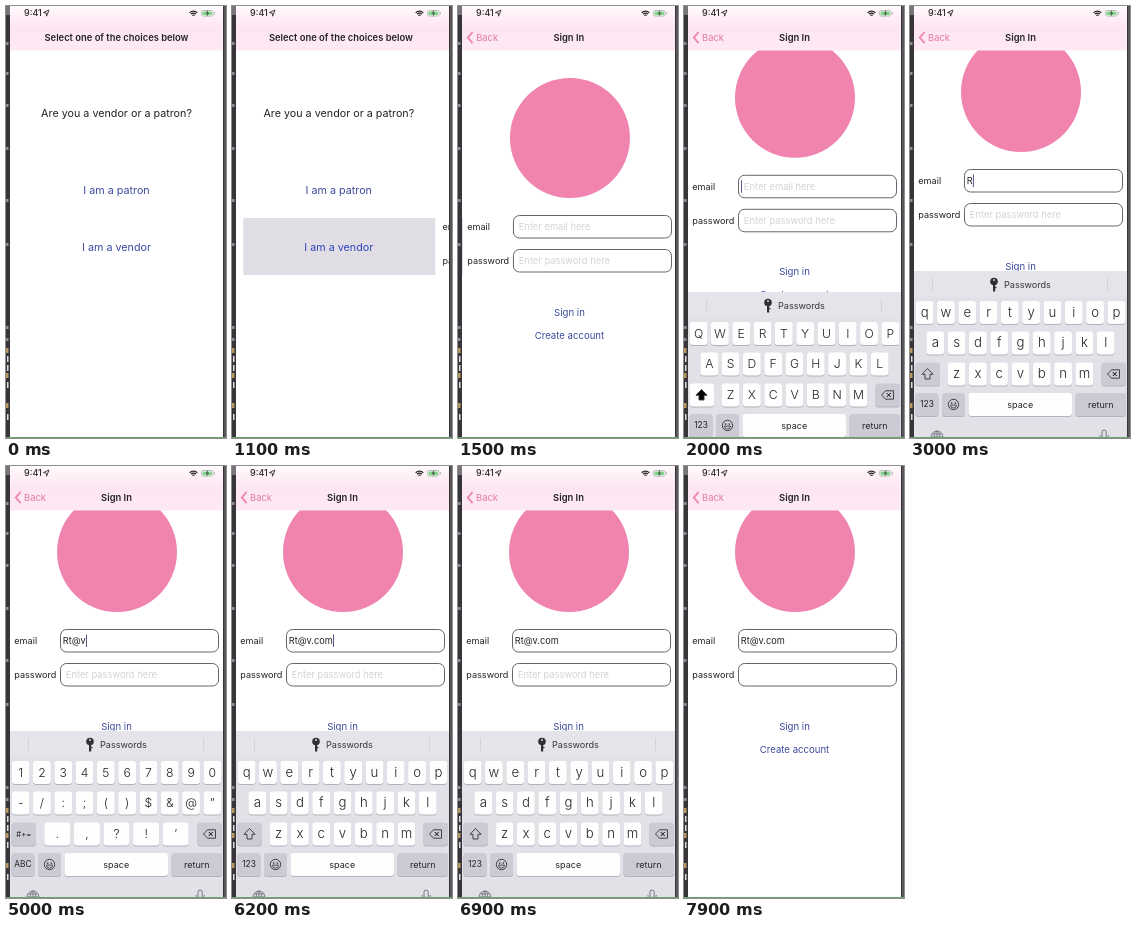
An HTML page with a canvas for the animation above (8 s loop, 220 px wide and 432 px high).

```html
<!DOCTYPE html>
<html lang="en">
<head>
<meta charset="utf-8">
<title>Sign in on a phone</title>
<style>
html, body { margin: 0; width: 100%; height: 100%; overflow: hidden; background: #fff; }
canvas { display: block; width: 220px; height: 432px; }
</style>
</head>
<body>
<canvas id="stage"></canvas>
<script>
const W = 220, H = 432, LOOP = 8000, TICK = 100;
const LEFT = 4, RIGHT = 217, WIDTH = RIGHT - LEFT, MID = 110.5, KB_TOP = 265;
const UI = 'Inter, Roboto, sans-serif';
const PINK = '#f084ae', LINK = '#3d4a9c', INK = '#232327';
const KB = '#e2e1e8', BAR = '#e5e4eb', GREY_KEY = '#cbcad5';

const canvas = document.getElementById('stage');
const c = canvas.getContext('2d');
const dpr = window.devicePixelRatio || 1;
canvas.width = W * dpr;
canvas.height = H * dpr;

const clamp = v => Math.max(0, Math.min(1, v));

// Critically damped spring from 0 to 1, settled after half a second
function spring(t, start) {
  const u = 18 * (t - start) / 1000;
  if (u <= 0) return 0;
  return u > 9 ? 1 : 1 - (1 + u) * Math.exp(-u);
}

const PRESS = 1000, PUSH = 1080, EMAIL_FOCUS = 1800, PASSWORD_FOCUS = 7000;

// Typing: time, character
const strokes = [[2900, 'R'], [3300, 't'], [4000, '@'], [4600, 'v'],
  [5200, '.'], [5700, 'c'], [5900, 'o'], [6100, 'm']];
// Keyboard layout: time, name
const layouts = [[0, 'upper'], [2900, 'lower'], [3700, 'symbols'],
  [4300, 'lower'], [4900, 'symbols'], [5400, 'lower']];
const rows = {
  upper: ['QWERTYUIOP', 'ASDFGHJKL', 'ZXCVBNM'],
  lower: ['qwertyuiop', 'asdfghjkl', 'zxcvbnm'],
  symbols: ['1234567890', '-/:;()$&@”', '.,?!’']
};

function text(s, x, y, size, color = INK, align = 'center', weight = 400) {
  c.font = `${weight} ${size}px ${UI}`;
  c.fillStyle = color;
  c.textAlign = align;
  c.textBaseline = 'alphabetic';
  c.fillText(s, x, y);
}

function rect(x, y, w, h, color) {
  c.fillStyle = color;
  c.fillRect(x, y, w, h);
}

function round(x, y, w, h, r, fill, stroke) {
  c.beginPath();
  c.roundRect(x, y, w, h, r);
  if (fill) { c.fillStyle = fill; c.fill(); }
  if (stroke) { c.strokeStyle = stroke; c.lineWidth = 1; c.stroke(); }
}

function poly(points, fill, stroke, width = 1, close = true) {
  c.beginPath();
  points.forEach(([x, y]) => c.lineTo(x, y));
  if (close) c.closePath();
  if (fill) { c.fillStyle = fill; c.fill(); }
  if (stroke) { c.strokeStyle = stroke; c.lineWidth = width; c.stroke(); }
}

function arc(x, y, r, a, b, color, width) {
  c.beginPath();
  c.arc(x, y, r, a, b);
  c.strokeStyle = color;
  c.lineWidth = width;
  c.stroke();
}

function dot(x, y, r, color) {
  c.beginPath();
  c.arc(x, y, r, 0, Math.PI * 2);
  c.fillStyle = color;
  c.fill();
}

function drawDesk() {
  rect(0, 0, W, H, '#37343a');
  rect(0, 0, 4, 9, '#77747a');
  for (const y of [36, 66, 98, 141, 193, 237, 320, 332]) rect(0, y, 2.5, 3, '#8f8b92');
  for (const y of [342, 367, 397]) rect(0, y, 2.5, 5, '#b8975f');
  for (const y of [350, 359, 376, 408]) rect(1, y, 1.5, 6, '#dedce0');
  rect(RIGHT + 1, 0, 2, H, '#59565c');
}

function drawChoices(t, shift) {
  const pressed = t >= PRESS;
  c.save();
  c.translate(shift, 0);
  if (pressed) rect(15, 212, 192, 57, '#e0dde4');
  text('Are you a vendor or a patron?', MID, 111, 10.75);
  text('I am a patron', MID, 188, 10.75, LINK);
  text('I am a vendor', MID, 245, 10.75, pressed ? '#3046bd' : LINK);
  c.restore();
}

function drawField(y, label, hint, value, caret) {
  text(label, 8.3, y + 14.7, 9.1, INK, 'left');
  round(54.5, y, 158, 22.5, 6, '#fff', '#66646a');
  if (value) text(value, 56.8, y + 14.3, 9.2, INK, 'left');
  else if (hint) text(hint, 59.8, y + 14.8, 9.35, '#d3d2d7', 'left');
  if (caret) {
    c.font = '9.2px ' + UI;
    const x = 57 + (value ? c.measureText(value).width : 0);
    rect(x, y + 5, 1, 12.5, '#55598c');
  }
}

function drawSignIn(t, shift, drop) {
  c.save();
  c.translate(shift, 0);
  rect(LEFT, 0, WIDTH, H, '#fff');
  c.translate(0, drop);
  dot(111, 86, 60, PINK);

  const typed = strokes.filter(s => s[0] <= t);
  const value = typed.map(s => s[1]).join('');
  const since = t - (typed.length ? typed[typed.length - 1][0] : EMAIL_FOCUS);
  const caret = t >= EMAIL_FOCUS && t < PASSWORD_FOCUS && since % 1000 < 600;
  drawField(163.5, 'email', 'Enter email here', value, caret);
  drawField(197.5, 'password', t < PASSWORD_FOCUS ? 'Enter password here' : '', '', false);

  text('Sign in', MID, 263.7, 9.6, LINK);
  text('Create account', MID, 286.7, 9.6, LINK);
  c.restore();
}

function drawStatus() {
  text('9:41', 18, 10.4, 9, '#2a2a2a', 'left', 500);
  poly([[43, 4], [40.6, 10.2], [40.2, 7], [37.4, 6.6]], null, '#333', 0.9);
  for (const r of [1.6, 3.5, 5.4]) arc(187.5, 10.6, r, Math.PI * 1.25, Math.PI * 1.75, '#222', 1.2);
  round(195.5, 4.5, 11.5, 5.6, 1.7, '#fff', '#b9beb9');
  round(196.5, 5.4, 9.5, 3.8, 1, '#84d38c');
  poly([[202.2, 3.7], [199.6, 7.6], [201.2, 7.6], [200.6, 10.8], [203.2, 6.8], [201.6, 6.8]], '#4a554a');
  rect(208, 6, 1, 2.6, '#b9beb9');
}

function drawHeader(p) {
  const g = c.createLinearGradient(0, 0, 0, 45);
  g.addColorStop(0, '#fffafd');
  g.addColorStop(0.2, '#fff0f7');
  g.addColorStop(0.5, '#fde6f2');
  g.addColorStop(1, '#fde9f4');
  rect(LEFT, 0, WIDTH, 44.5, g);
  c.globalAlpha = 1 - clamp(p * 1.6 - 0.15);
  text('Select one of the choices below', MID - 30 * p, 35, 9.4, INK, 'center', 600);
  c.globalAlpha = clamp(p * 1.6 - 0.6);
  text('Sign In', MID + 70 * (1 - p), 35, 9.4, INK, 'center', 600);
  poly([[14.6, 26], [9.8, 31.6], [14.6, 37.2]], null, PINK, 1.8, false);
  text('Back', 18 + 35 * (1 - p), 35, 9.4, '#e37aa7', 'left');
  c.globalAlpha = 1;
  drawStatus();
}

function key(x, y, w, label, size, dark, weight = 400) {
  round(x, y + 1, w, 23, 3.2, '#b3b2bc');
  round(x, y, w, 23, 3.2, dark ? GREY_KEY : '#fefefe');
  if (label) text(label, x + w / 2, y + 11.5 + size * 0.34, size, INK, 'center', weight);
}

function keyRow(chars, cy, pitch, width, size) {
  [...chars].forEach((ch, i) => {
    const x = MID + (i - (chars.length - 1) / 2) * pitch;
    key(x - width / 2, cy - 11.5, width, ch, size, false, 300);
  });
}

function drawShift(active) {
  const arrow = [[17.5, 362.5], [23, 368.3], [20, 368.3], [20, 373], [15, 373], [15, 368.3], [12, 368.3]];
  poly(arrow, active ? '#000' : null, '#333', 0.9);
}

function drawDelete() {
  poly([[197.5, 368], [201.5, 363.8], [209.5, 363.8], [209.5, 372.2], [201.5, 372.2]], null, '#333', 0.9);
  poly([[202.8, 366], [206.8, 370]], null, '#333', 0.9);
  poly([[206.8, 366], [202.8, 370]], null, '#333', 0.9);
}

function drawSmiley(x, y) {
  arc(x, y, 5.2, 0, Math.PI * 2, '#333', 0.9);
  dot(x - 1.8, y - 1.4, 0.8, '#333');
  dot(x + 1.8, y - 1.4, 0.8, '#333');
  c.beginPath();
  c.arc(x, y + 0.6, 3, 0, Math.PI);
  c.closePath();
  c.lineWidth = 0.8;
  c.stroke();
}

function drawGlobe(x, y) {
  arc(x, y, 6, 0, Math.PI * 2, '#73767e', 0.9);
  c.beginPath();
  c.ellipse(x, y, 2.8, 6, 0, 0, Math.PI * 2);
  c.moveTo(x - 6, y);
  c.lineTo(x + 6, y);
  c.moveTo(x, y - 6);
  c.lineTo(x, y + 6);
  c.moveTo(x - 5, y - 3);
  c.lineTo(x + 5, y - 3);
  c.stroke();
}

function drawPasswordsBar() {
  rect(LEFT, KB_TOP, WIDTH, 26, BAR);
  rect(22, 272, 0.8, 13, '#d0cfd7');
  rect(197, 272, 0.8, 13, '#d0cfd7');
  dot(84, 275.5, 3.8, '#303035');
  rect(83, 278, 2.2, 7.5, '#303035');
  rect(85, 281, 1.5, 1.2, '#303035');
  dot(84, 274, 0.9, BAR);
  text('Passwords', 94, 282.4, 9.1, '#36363b', 'left');
}

function drawKeyboard(t, drop) {
  c.save();
  c.translate(0, drop);
  rect(LEFT, KB_TOP, WIDTH, H - KB_TOP, KB);
  drawPasswordsBar();

  const name = layouts.filter(l => l[0] <= t).pop()[1];
  const symbols = name === 'symbols';
  const size = name === 'lower' ? 13.2 : 12.2;
  const [top, middle, low] = rows[name];
  keyRow(top, 306.5, 21.3, 17.8, size);
  keyRow(middle, 337, 21.3, 17.8, size);
  keyRow(low, 368, symbols ? 29.6 : 21.3, symbols ? 26 : 17.8, size);

  key(5.5, 356.5, 24.5, symbols ? '#+=' : '', 7.6, name !== 'upper');
  if (!symbols) drawShift(name === 'upper');
  key(191.5, 356.5, 24.5, '', 9, true);
  drawDelete();

  key(5.5, 387, 23, symbols ? 'ABC' : '123', 8.4, true);
  key(32, 387, 23, '', 9, true);
  drawSmiley(43.5, 398.5);
  key(58.5, 387, 103.5, 'space', 9);
  key(165.5, 387, 50.5, 'return', 9, true);

  drawGlobe(27, 431);
  round(192, 424, 4.2, 8, 2.1, null, '#73767e');
  arc(194.1, 429, 4.2, 0, Math.PI, '#73767e', 1);
  c.restore();
}

function draw(t) {
  c.setTransform(dpr, 0, 0, dpr, 0, 0);
  const push = spring(t, PUSH);
  const rise = spring(t, EMAIL_FOCUS);

  drawDesk();
  c.save();
  c.beginPath();
  c.rect(LEFT, 0, WIDTH, H);
  c.clip();
  rect(LEFT, 0, WIDTH, H, '#fff');
  if (push < 1) drawChoices(t, -WIDTH * 0.34 * push);
  if (push > 0) drawSignIn(t, WIDTH * (1 - push), 46 * (1 - rise));
  drawHeader(push);
  if (rise > 0 && t < PASSWORD_FOCUS) drawKeyboard(t, (H - KB_TOP) * (1 - rise));
  c.restore();
  rect(0, 431, W, 1, '#6aa468');
}

const start = performance.now();
function frame() {
  const t = (performance.now() - start) % LOOP;
  draw(Math.floor(t / TICK) * TICK);
  requestAnimationFrame(frame);
}
frame();
</script>
</body>
</html>
```
